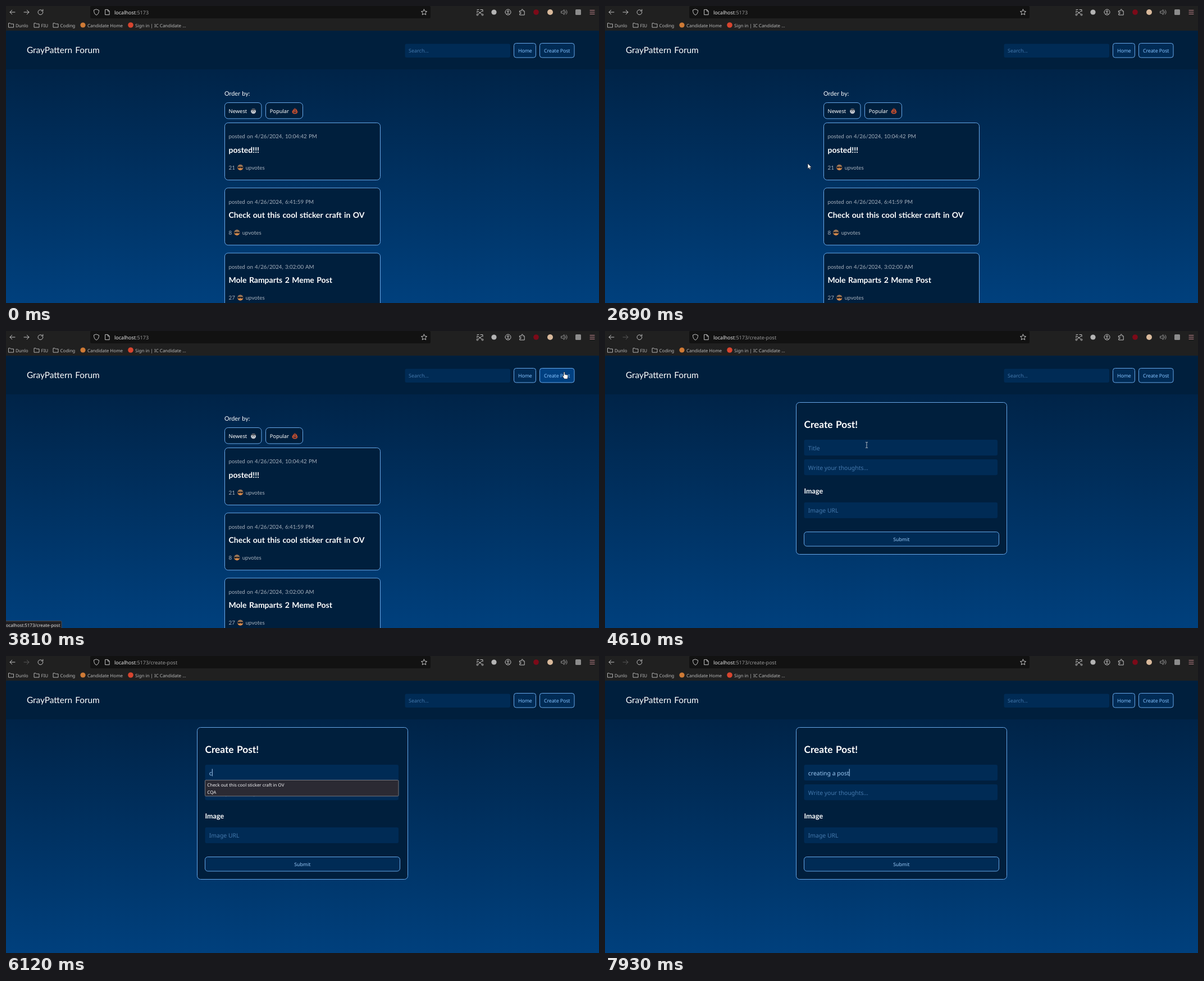
An HTML page for the animation above (8000 ms loop, 1056 by 530 pixels).

```html
<!DOCTYPE html>
<html lang="en">
<head>
<meta charset="utf-8">
<title>Forum</title>
<style>
  html, body { margin: 0; width: 100%; height: 100%; overflow: hidden; background: #001f3f; }
  svg { display: block; width: 100%; height: 100%; }
  text { white-space: pre; text-rendering: geometricPrecision; }
  .site { font-family: Lato, "Noto Sans", sans-serif; word-spacing: .07em; }
  .ui { font-family: "Noto Sans", "Open Sans", sans-serif; }
  .bold { font-weight: 700; }
  .mid { font-weight: 500; }
</style>
</head>
<body>
<svg id="stage" viewBox="0 0 1056 530" xmlns="http://www.w3.org/2000/svg"></svg>
<script>
const LOOP = 8000;
const NAVY = '#001f3d', FIELD = '#002b55', LINE = '#69a9ea', LINK = '#84c2ff', HINT = '#4479ad';
const stage = document.getElementById('stage');

// Markup helpers
const text = (x, y, size, fill, str, cls = 'site', extra = '') =>
  `<text x="${x}" y="${y}" font-size="${size}" fill="${fill}" class="${cls}" ${extra}>${str}</text>`;
const rect = (x, y, w, h, r, fill, extra = '') =>
  `<rect x="${x}" y="${y}" width="${w}" height="${h}" rx="${r}" fill="${fill}" ${extra}/>`;
const box = (x, y, w, h, r, fill, id = '') =>
  rect(x, y, w, h, r, fill, `stroke="${LINE}" ${id && `id="${id}"`}`);
const dot = (x, y, r, fill) => `<circle cx="${x}" cy="${y}" r="${r}" fill="${fill}"/>`;
const icon = (x, y, d, extra = '') =>
  `<path transform="translate(${x} ${y})" d="${d}" fill="none" stroke="#c4c4c4" stroke-linecap="round" stroke-linejoin="round" ${extra}/>`;

const folder = x => icon(x, 34, 'M.5 3.7V-3.3H3.6L4.8-2H9.5V3.7Z', 'stroke-width=".9"');

const shades = (x, y) => dot(x, y, 5, '#d68a4b') +
  `<path transform="translate(${x} ${y})" d="M-4.8-1.6A5 5 0 0 1 4.8-1.6Z" fill="#9a7658"/>` +
  `<path transform="translate(${x} ${y})" d="M-5-1.6H5L4.2 1.2H1L0 0L-1 1.2H-4.2Z" fill="#26252b"/>`;

const baby = (x, y) => dot(x, y + .4, 4.5, '#c3c8d0') +
  `<path transform="translate(${x} ${y})" d="M-4.4-1L-3-4L-1-3L0-5L1.2-3L3.4-4L4.4-1L2-1.4L0-.6L-2-1.4Z" fill="#43474f"/>` +
  dot(x - 1.5, y + 1, .7, '#33363d') + dot(x + 1.5, y + 1, .7, '#33363d');

const spring = (x, y) => `<g transform="translate(${x} ${y})" fill="none" stroke="#e4572e" stroke-width="1.4" stroke-linecap="round">
  <path d="M-3-.8C-5 1-4.6 4.3 0 4.3S5 1 3-.8"/>
  <path d="M-2.2 1.6C-3.4 0-.9-1-2-3M0 1.8C-1.2 0 1.2-2 0-4.4M2.2 1.6C1 0 3.4-1 2.2-3"/></g>`;

function browser() {
  const marks = [[17, 'Dunlo'], [62.5, 'FIU'], [96.5, 'Coding'], [145, 'Candidate Home'], [230, 'Sign in | IC Candidate ...']];
  return rect(0, 0, 1056, 44, 0, '#202020') + rect(150, 0, 606, 22, 2, '#121212') +
    icon(11.5, 11, 'M4.5 0H-4.5M-.8-3.7L-4.5 0L-.8 3.7') +
    `<g id="forward">${icon(36.5, 11, 'M-4.5 0H4.5M.8-3.7L4.5 0L.8 3.7')}</g>` +
    icon(61.5, 11, 'M4.3-.5A4.4 4.4 0 1 1 2.6-3.4M4.3-4.8V-2H1.6') +
    icon(161, 11, 'M0-5L4.5-3.4C4.6 1 3 3.8 0 5.2C-3 3.8-4.6 1-4.5-3.4Z') +
    icon(180.5, 11, 'M-3.5-4.6H.8L3.6-1.8V4.6H-3.5ZM.8-4.6V-1.8H3.6') +
    icon(744.5, 11, 'M0-5L1.5-1.7L5.1-1.3L2.4 1.1L3.2 4.7L0 2.9L-3.2 4.7L-2.4 1.1L-5.1-1.3L-1.5-1.7Z') +
    icon(844, 11, 'M-5-4.5H-2M1-4.5H5V-1M-5-2V1M-4 4L4-2M-4-2L4 4M-4.6 3A1.5 1.5 0 1 0-3 4.6M4.6 3A1.5 1.5 0 1 1 3 4.6') +
    dot(869, 11, 4.6, '#b4b4b4') +
    icon(894, 11, 'M-5 0A5 5 0 1 1 5 0A5 5 0 1 1-5 0M-2.8 3.4C-2 1.8 2 1.8 2.8 3.4M-1.5-1.2A1.5 1.5 0 1 1 1.5-1.2A1.5 1.5 0 1 1-1.5-1.2') +
    icon(919, 11, 'M-4.2-2.2H-1V-3.8A1.3 1.3 0 0 1 1.6-3.8V-2.2H4.2V5H-4.2V2.6H-3A1.2 1.2 0 0 0-3 .2H-4.2Z') +
    dot(944, 11, 4.8, '#7c0a18') + dot(969, 11, 5, '#d9b99b') +
    icon(994, 11, 'M-5-1.6H-3L0-4.4V4.4L-3 1.6H-5ZM2-2A3 3 0 0 1 2 2M3.4-4A5.2 5.2 0 0 1 3.4 4', 'opacity=".7"') +
    rect(1014, 6, 10, 10, 1.5, '#8c8c8c') +
    icon(1044, 11, 'M-4-3.3H4M-4 0H4M-4 3.3H4', 'style="stroke:#c78a92"') +
    [4, 49.5, 83.5].map(folder).join('') + dot(137, 34, 4.6, '#cf7a35') + dot(222, 34, 4.8, '#d8452f') +
    marks.map(([x, s]) => text(x, 37.6, 8, '#b9b9b9', s, 'ui')).join('') +
    text(193, 14.6, 9, '#9a9a9a', '<tspan fill="#e6e6e6">localhost</tspan>:5173<tspan id="path">/create-post</tspan>', 'ui');
}

function header() {
  const tight = 'letter-spacing="-.13"';
  return rect(0, 44, 1056, 69, 0, NAVY) + text(37, 84, 15.4, '#fff', 'GrayPattern Forum') +
    rect(710.5, 67.5, 187.5, 24.5, 3, FIELD) + text(717, 83, 9, HINT, 'Search...', 'ui') +
    box(904.5, 66.5, 39, 25.5, 4, FIELD, 'home') + text(912, 83, 8.9, LINK, 'Home', 'ui', tight) +
    box(950.5, 66.5, 61.5, 25.5, 4, FIELD, 'create') + text(958, 83, 8.9, LINK, 'Create Post', 'ui', tight);
}

function post(i, date, title, votes) {
  const y = 208.5 + i * 116.2, dx = votes > 9 ? 0 : -6;
  return box(389.5, y, 277, 102, 6, NAVY, 'card' + i) +
    text(396.5, y + 27.8, 9.75, '#a5b0bd', `posted on ${date}`) +
    text(396.5, y + 53.5, 14, '#fff', title, 'site bold') +
    text(396.5, y + 83.5, 9.75, '#a5b0bd', votes) + shades(417.3 + dx, y + 79.8) +
    text(426.7 + dx, y + 83.5, 9.75, '#a5b0bd', 'upvotes');
}

const feed = () => text(389, 160.3, 10.8, '#fff', 'Order by:') +
  box(389.5, 172.5, 65.5, 28.5, 6, NAVY) + text(396.5, 191, 9.4, '#fff', 'Newest', 'ui mid') + baby(440.6, 187.4) +
  box(462.5, 172.5, 66, 28.5, 6, NAVY) + text(469.7, 191, 9.3, '#fff', 'Popular', 'ui mid') + spring(514.4, 187.4) +
  post(0, '4/26/2024, 10:04:42 PM', 'posted!!!', 21) +
  post(1, '4/26/2024, 6:41:59 PM', 'Check out this cool sticker craft in OV', 8) +
  post(2, '4/26/2024, 3:02:00 AM', 'Mole Ramparts 2 Meme Post', 27);

const field = (y, hint, id = '') => rect(354.5, y, 344.5, 28.3, 3, FIELD) +
  text(361.8, y + 18.5, 10.45, HINT, hint, 'ui', id && `id="${id}"`);

const form = () => box(340.5, 127.5, 375, 271, 6, NAVY) + text(354.5, 173, 17.3, '#fff', 'Create Post!', 'site bold') +
  field(194, 'Title', 'entry') + field(229, 'Write your thoughts...') +
  text(354.5, 290, 12.5, '#fff', 'Image', 'site bold') + field(305.8, 'Image URL') +
  box(354.5, 358.5, 347, 25.5, 5, FIELD) + text(527.8, 375, 8.7, '#9bcbfa', 'Submit', 'ui', 'text-anchor="middle"') +
  rect(362, 201.5, 1, 13, 0, '#a9cdf2', 'id="caret"') +
  `<g id="suggest">${rect(354.5, 221.5, 344.5, 28.5, 1.5, '#2b2a33', 'stroke="#77767d"')}` +
  text(358.3, 232.7, 7.9, '#f4f4f6', 'Check out this cool sticker craft in OV', 'ui') +
  text(358.3, 246.4, 7.9, '#f4f4f6', 'CQA', 'ui') + '</g>';

stage.innerHTML = `<defs><linearGradient id="bg" x1="0" y1="0" x2="0" y2="1">
  <stop stop-color="#001f3f"/><stop offset="1" stop-color="#00407d"/></linearGradient></defs>` +
  rect(0, 44, 1056, 486, 0, 'url(#bg)') + header() +
  `<g id="feed">${feed()}</g><g id="form">${form()}</g>` + browser() +
  `<g id="status">${rect(-2, 517.5, 101, 14, 1.5, '#202024', 'stroke="#4b4b50"')}${text(-2.4, 528, 7.95, '#e2e2e2', 'localhost:5173/create-post', 'ui')}</g>` +
  `<g id="pointer"><circle id="press" r="8.5" fill="#b5bd22" opacity=".9"/>
  <path id="arrow" d="M0 0V9.4L2.2 7.4L3.7 10.8L5.2 10.1L3.7 6.9H6.6Z" fill="#fff" stroke="#111" stroke-width=".6"/>
  <path id="hand" d="M.6 1.2C.6-.3 2.6-.3 2.6 1.2V4.6L7 5.4C8 5.6 8.3 6.2 8.2 7.2L7.4 12.4H1.8L-1.4 8C-2 6.8-.6 6.2.6 7.8Z" fill="#fff" stroke="#111" stroke-width=".6"/>
  <path id="beam" d="M-2-5H-.6L0-4.5L.6-5H2M0-4.5V4.5M-2 5H-.6L0 4.5L.6 5H2" fill="none" stroke="#c9cdd2" stroke-width=".9"/></g>`;

const el = {};
stage.querySelectorAll('[id]').forEach(n => el[n.id] = n);
const show = (id, on) => el[id].style.display = on ? '' : 'none';

// Pointer path: time, x, y
const PATH = [
  [290, 926, 514], [490, 923, 273], [690, 985, 150], [790, 1019, 98], [890, 994, 76], [1090, 918.5, 71],
  [1190, 916, 72], [1390, 900, 77], [1500, 900, 77], [1690, 740, 72], [1890, 420, 66], [2090, 122, 72], [2190, 113, 120],
  [2390, 207, 163], [2590, 354, 277], [2690, 412.3, 309.5], [2790, 530, 296], [2990, 890, 135],
  [3100, 985, 56], [3200, 1013, 69], [3400, 994, 73], [3700, 992.5, 73], [4010, 992.5, 73],
  [4210, 850, 152], [4410, 540, 226], [4460, 496, 228], [4610, 466, 203.5], [8000, 466, 203.5]
];
const SWITCH = 3900;
const STEP = 100.53;
const snap = t => t < 290 ? 0 : 290 + Math.floor((t - 290) / STEP + .12) * STEP;

function pointerAt(t) {
  const i = Math.max(1, PATH.findIndex(p => p[0] > t));
  const [a, b] = [PATH[i - 1], PATH[i]];
  const k = Math.max(0, (t - a[0]) / (b[0] - a[0]));
  return [a[1] + (b[1] - a[1]) * k, a[2] + (b[2] - a[2]) * k];
}

const inside = ([x, y], [l, t, r, b]) => x >= l && x <= r && y >= t && y <= b;
const BUTTONS = { home: [904, 66, 944, 92], create: [950, 66, 1012, 92] };
const CARD = [389, 208, 667, 312];
const FIELDS = [[710, 67, 898, 92], [354, 194, 699, 222], [354, 229, 699, 257]];

// Share of the last 200 ms spent over an area
function hover(t, area) {
  let n = 0;
  for (let i = 0; i < 10; i++) {
    const s = t - i * 20;
    if (s >= 290 && inside(pointerAt(s), area)) n++;
  }
  return n / 10;
}
const mix = (a, b, k) => `rgb(${a.map((v, i) => Math.round(v + (b[i] - v) * k))})`;

// Keystroke times for the title
const TITLE = 'creating a post';
const KEYS = [5930, 6320, 6420, 6620, 6820, 6920, 7020, 7120, 7220, 7320, 7530, 7630, 7730, 7830, 7930];

function draw(now) {
  const t = now % LOOP, s = snap(t);
  const writing = t >= SWITCH;
  show('feed', !writing);
  show('form', writing);
  show('path', writing);
  el.forward.setAttribute('opacity', writing ? .35 : 1);
  show('status', t >= 3300 && !writing);

  for (const id in BUTTONS)
    el[id].setAttribute('fill', mix([0, 43, 85], [0, 64, 128], hover(s, BUTTONS[id])));
  el.card0.setAttribute('fill', mix([0, 31, 61], [0, 35, 72], writing ? 0 : hover(s, CARD)));

  const pos = pointerAt(s);
  const link = Object.values(BUTTONS).some(b => inside(pos, b));
  const typing = FIELDS.slice(0, writing ? 3 : 1).some(f => inside(pos, f));
  show('pointer', t >= 290 && t < KEYS[0]);
  show('hand', link);
  show('beam', typing);
  show('arrow', !link && !typing);
  show('press', t >= 3600 && t < 3800 || t >= 4810 && t < 4910);
  el.pointer.setAttribute('transform', `translate(${pos[0].toFixed(1)} ${pos[1].toFixed(1)})`);

  const count = KEYS.filter(k => t >= k).length;
  el.entry.textContent = count ? TITLE.slice(0, count) : 'Title';
  el.entry.setAttribute('fill', count ? '#9fcbf5' : HINT);
  show('suggest', t >= 6030 && t < 6320);
  show('caret', t >= 4810 && t < 5320 || count > 0);
  if (writing) el.caret.setAttribute('x', count ? 361.8 + el.entry.getComputedTextLength() : 362);
}

let start;
function tick(now) {
  start ??= now;
  draw(now - start);
  requestAnimationFrame(tick);
}
draw(0);
requestAnimationFrame(tick);
</script>
</body>
</html>
```
